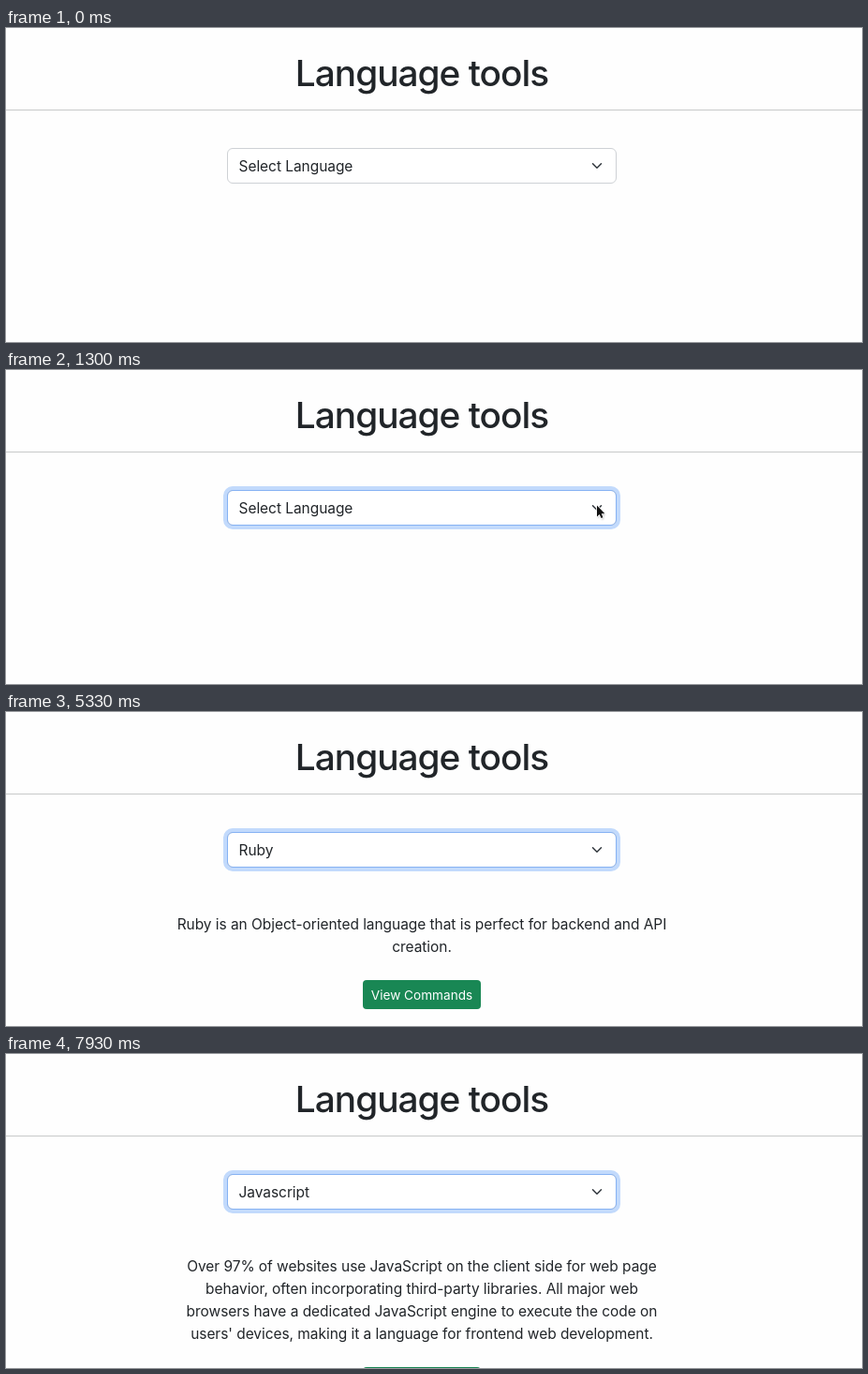
An HTML page for the animation above (8 s loop, 914 by 335 pixels).

```html
<!DOCTYPE html>
<html lang="en">
<head>
<meta charset="utf-8">
<title>Language tools</title>
<style>
  html, body { margin: 0; width: 100%; height: 100%; overflow: hidden; background: #fefefe; }
  svg { display: block; width: 100vw; height: 100vh; }
  text {
    font: 400 15.5px Inter, Roboto, sans-serif;
    font-optical-sizing: none;
    letter-spacing: -0.05px;
    fill: #212529;
  }
  .mid { text-anchor: middle; }
  .title { font-size: 38.8px; font-weight: 500; letter-spacing: -1px; }
  .label { font-size: 13.6px; letter-spacing: 0; fill: #fff; }
</style>
</head>
<body>
<svg viewBox="0 0 914 335">
  <text class="mid title" x="444" y="62">Language tools</text>
  <rect y="87" width="914" height="1" fill="#c8c9ca"/>

  <rect id="ring" x="234" y="126" width="420" height="42" rx="8" fill="none" stroke="#c2dafc" stroke-width="4"/>
  <rect x="236.5" y="128.5" width="415" height="37" rx="5.5" fill="#fff" stroke="#ced1d5"/>
  <rect id="edge" x="236.5" y="128.5" width="415" height="37" rx="5.5" fill="none" stroke="#86b2f3"/>
  <text id="choice" x="248.5" y="153"></text>
  <path d="M626.5 144.8l4.5 4.5 4.5-4.5" fill="none" stroke="#343a40" stroke-width="1.5" stroke-linecap="round" stroke-linejoin="round"/>

  <g id="about"></g>
  <g id="button">
    <rect x="381" y="286" width="126" height="31" rx="4" fill="#198754"/>
    <text class="mid label" x="444" y="306.5">View Commands</text>
  </g>

  <g id="cursor">
    <path d="M0 0V12L2.7 9.5 4.5 13.6 6.5 12.7 4.7 8.7H8.4Z" transform="translate(.8 1.6)" fill="#000" opacity=".3" style="filter: blur(1.2px)"/>
    <path d="M0 0V12L2.7 9.5 4.5 13.6 6.5 12.7 4.7 8.7H8.4Z" fill="#111" stroke="#fff" stroke-width="1.6" stroke-linejoin="round" paint-order="stroke"/>
  </g>
</svg>
<script>
const LOOP = 8000, STEP = 130;
const el = id => document.getElementById(id);

const pages = [
  { from: 0, choice: "Select Language", lines: [] },
  { from: 2990, choice: "Ruby", lines: [
    "Ruby is an Object-oriented language that is perfect for backend and API",
    "creation."
  ] },
  { from: 6240, choice: "Javascript", lines: [
    "Over 97% of websites use JavaScript on the client side for web page",
    "behavior, often incorporating third-party libraries. All major web",
    "browsers have a dedicated JavaScript engine to execute the code on",
    "users' devices, making it a language for frontend web development."
  ] }
];

// Pointer visits: [time, x, y] points, hidden from `end` on
const visits = [
  { end: 2990, path: [[130, 519, 322], [390, 580, 200], [650, 638, 130], [910, 635, 141], [1040, 632.5, 144.5], [1300, 631, 144.5]] },
  { end: 5330, path: [[2990, 540, 153.5], [3250, 537, 150]] },
  { end: 7930, path: [[6240, 529.5, 172.5], [6370, 529, 175], [6890, 528, 177], [7150, 522, 186], [7800, 470, 322]] }
];

function pointAt(path, t) {
  const next = path.findIndex(p => p[0] > t);
  if (next < 0) return path[path.length - 1].slice(1);
  const a = path[next - 1], b = path[next];
  const k = (t - a[0]) / (b[0] - a[0]);
  return [a[1] + (b[1] - a[1]) * k, a[2] + (b[2] - a[2]) * k];
}

let shown = null;
function showPage(page) {
  if (page === shown) return;
  shown = page;
  el("choice").textContent = page.choice;
  el("about").innerHTML = page.lines
    .map((line, i) => `<text class="mid" x="444" y="${232 + 24 * i}">${line}</text>`).join("");
  el("button").setAttribute("visibility", page.lines.length ? "visible" : "hidden");
  el("button").setAttribute("transform", `translate(0 ${24 * (page.lines.length - 2)})`);
}

function draw() {
  const t = Math.floor((performance.now() % LOOP) / STEP) * STEP;
  showPage(pages.filter(p => p.from <= t).pop());

  const focus = Math.min(1, Math.max(0, (t - 1040) / 200));
  el("ring").setAttribute("opacity", focus);
  el("edge").setAttribute("opacity", focus);

  const visit = visits.find(v => t >= v.path[0][0] && t < v.end);
  el("cursor").setAttribute("visibility", visit ? "visible" : "hidden");
  if (visit) el("cursor").setAttribute("transform", `translate(${pointAt(visit.path, t)})`);
  requestAnimationFrame(draw);
}
draw();
</script>
</body>
</html>
```
